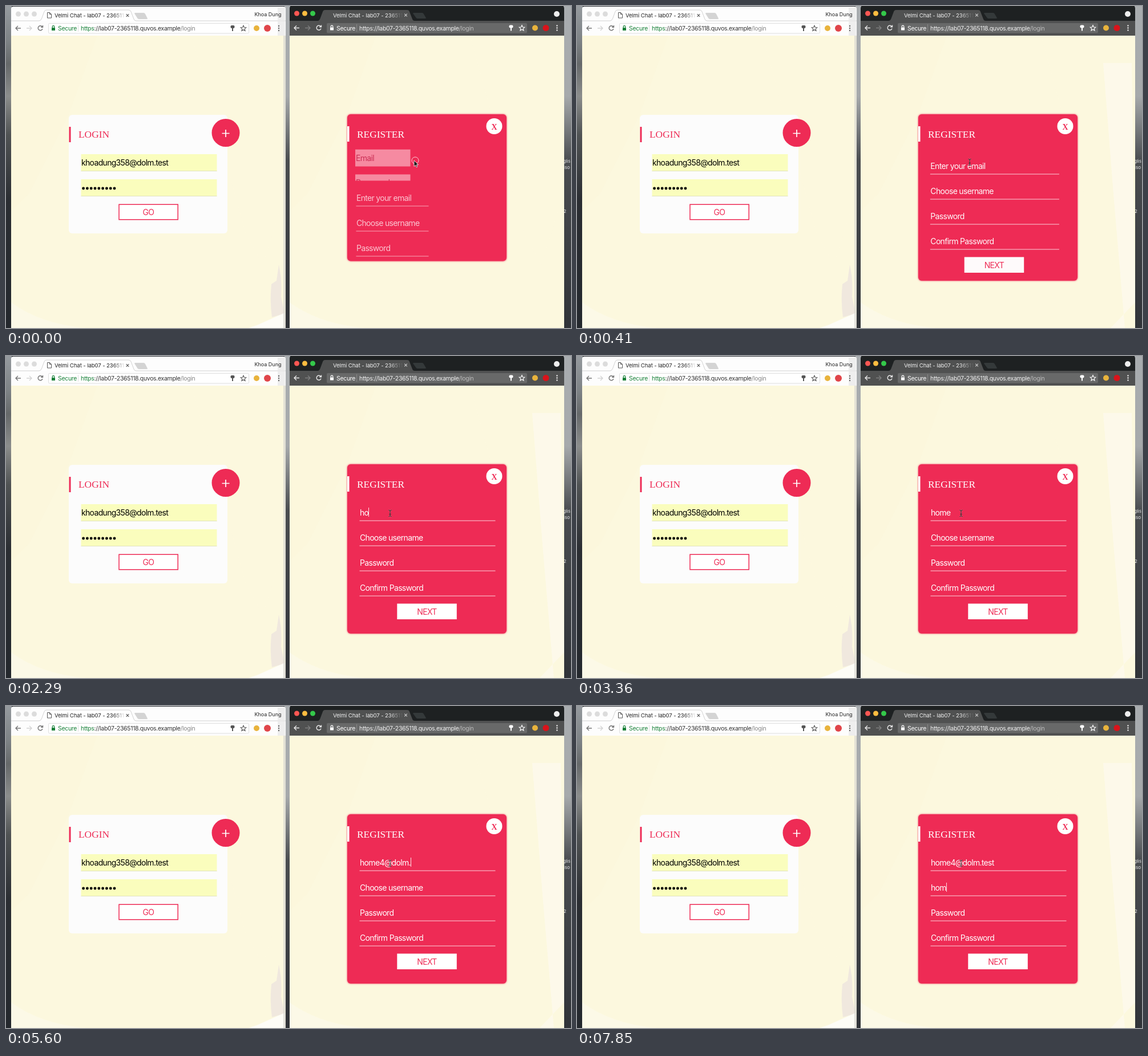
Animation, 990 px wide and 565 px high, one loop 8 s. Source, as an HTML page:

```html
<!DOCTYPE html>
<html lang="en">
<head>
<meta charset="utf-8">
<title>Sign-up form</title>
<style>
  html, body { margin: 0; width: 100%; height: 100%; overflow: hidden; background: #2b2e33; }
  svg { display: block; width: 100vw; height: 100vh; }
  text { font-family: Inter, sans-serif; white-space: pre; }
  .field { font-size: 14px; letter-spacing: -.68px; }
  .head { font: 17.4px "Liberation Serif", serif; }
  .bar { font-size: 10.5px; letter-spacing: -.32px; }
  .tab { font-size: 9.6px; letter-spacing: -.1px; }
  .icon { fill: none; stroke-width: 1.4; }
</style>
</head>
<body>
<svg viewBox="0 0 990 565" preserveAspectRatio="none">
  <defs>
    <linearGradient id="rock" x2="0" y2="1">
      <stop stop-color="#959a9e"/><stop offset=".11" stop-color="#7d8285"/>
      <stop offset=".18" stop-color="#66696a"/><stop offset=".28" stop-color="#8b8d8c"/>
      <stop offset=".4" stop-color="#505354"/><stop offset=".6" stop-color="#2b2e33"/>
      <stop offset="1" stop-color="#24282d"/>
    </linearGradient>
    <linearGradient id="mist" x2="0" y2="1">
      <stop stop-color="#a9adb0"/><stop offset=".28" stop-color="#a6a9ab"/>
      <stop offset=".48" stop-color="#4a4d50"/><stop offset="1" stop-color="#303338"/>
    </linearGradient>
    <linearGradient id="fadeL" gradientUnits="userSpaceOnUse" x1="188" x2="207"><stop stop-color="#222"/><stop offset="1" stop-color="#222" stop-opacity=".1"/></linearGradient>
    <linearGradient id="fadeR" gradientUnits="userSpaceOnUse" x1="672" x2="692"><stop stop-color="#f0f0f0"/><stop offset="1" stop-color="#f0f0f0" stop-opacity=".1"/></linearGradient>
    <filter id="glow" x="-10%" y="-10%" width="120%" height="120%"><feGaussianBlur stdDeviation="1.6"/></filter>
    <clipPath id="loginClip"><rect id="loginMask"/></clipPath>
    <clipPath id="formClip"><rect id="formMask" x="598" y="240" width="279"/></clipPath>
    <g id="nav" class="icon">
      <path d="M9 0H0M4-4L0 0l4 4"/>
      <path d="M19 0h9M24-4l4 4-4 4" opacity=".3"/>
      <path d="M46.500-2.500A4 4 0 1 0 47 1M47.500-5v3.300h-3.300"/>
    </g>
    <g id="lights"><circle cx="-14" r="4.500"/><circle r="4.500"/><circle cx="14" r="4.500"/></g>
    <g id="lock"><rect x="-3" y="-1" width="6" height="5" rx=".6"/><path class="icon" stroke="currentColor" style="stroke-width:1.2" d="M-1.800-1v-1.500a1.800 1.800 0 0 1 3.600 0V-1"/></g>
    <g id="key"><rect x="-3.500" y="-5" width="7" height="5" rx="2"/><rect x="-1" y="-1" width="2" height="6"/></g>
    <path id="star" fill="none" stroke-width="1.100" d="M0-4.800L1.400-1.500 4.800-1.200 2.200 1.100 3 4.500 0 2.700-3 4.500-2.200 1.100-4.800-1.200-1.400-1.500Z"/>
    <g id="dots"><circle cy="-4" r="1.200"/><circle r="1.200"/><circle cy="4" r="1.200"/></g>
    <path id="cross" class="icon" style="stroke-width:1.200" d="M-2.300-2.300l4.600 4.600M2.300-2.300l-4.600 4.600"/>
  </defs>

  <!-- desktop -->
  <rect width="10" height="565" fill="url(#rock)"/>
  <rect x="488" width="10" height="565" fill="url(#mist)"/>
  <rect x="977" width="13" height="565" fill="url(#mist)"/>
  <g fill="#e8e8e8" font-size="8"><text x="976" y="275">glis</text><text x="977" y="286">iso</text><text x="977" y="363">2</text></g>

  <!-- left window -->
  <path d="M9 565V5q0-4 4-4H486q4 0 4 4V565Z" fill="#fdfdfd"/>
  <use href="#lights" x="35.500" y="14" fill="#dcdcdc"/>
  <path d="M9 26H58q3 0 4.500-4L67 10q1-3 4-3H215q3 0 4 3l5 13q1 3 4 3H490" fill="#fff" stroke="#d2d2d2"/>
  <path d="M227 12h14q2 0 3 2l4 8q0 1-2 1h-13q-2 0-3-2l-5-8q0-1 2-1Z" fill="#d4d4d4"/>
  <path d="M72.500 11.500h4l3 3v6.500h-7ZM76.500 11.500v3h3" fill="#fff" stroke="#555"/>
  <text class="tab" x="85" y="20" fill="url(#fadeL)">Velmi Chat - lab07 - 236511</text>
  <use href="#cross" x="213" y="16.500" stroke="#555"/>
  <rect x="476" y="2" width="13" height="50" fill="#e8e8e8" opacity=".7"/>
  <text x="482.500" y="17.500" font-size="9" text-anchor="end" fill="#222">Khoa Dung</text>
  <use href="#nav" x="17" y="39" stroke="#777"/>
  <rect x="74.500" y="30.500" width="351" height="17.500" rx="2" fill="#fff" stroke="#dedede"/>
  <g fill="#188038" color="#188038"><use href="#lock" x="83" y="39"/><text class="bar" x="91" y="43">Secure</text></g>
  <path d="M126.500 33v12" stroke="#ddd"/>
  <text class="bar" x="131" y="43" fill="#333"><tspan fill="#188038">https</tspan>://lab07-2365118.quvos.example<tspan fill="#888">/login</tspan></text>
  <use href="#key" x="397" y="39" fill="#555"/><use href="#star" x="416" y="39" stroke="#555"/>
  <circle cx="439" cy="39" r="5" fill="#e9b33c"/><circle cx="458" cy="39" r="6" fill="#e0454a"/>
  <use href="#dots" x="478" y="39" fill="#666"/>
  <rect x="9" y="52" width="481" height="513" fill="#fcf8de"/>
  <g id="wash">
    <path d="M9 52H160L110 190 40 330 9 360Z" fill="#fcf5d8" opacity=".3"/>
    <path d="M325 52H489V330L450 455 420 400Z" fill="#fdf9df" opacity=".6"/>
    <path d="M9 520Q60 558 140 565H9Z" fill="#fdfaea" opacity=".8"/>
  </g>
  <path d="M478 454Q484 480 482 510L488 540 466 546Q462 520 465 488L474 482Z" fill="#eee5df" opacity=".8"/>
  <path d="M440 560L489 538V565H425Z" fill="#fefdf7"/>
  <rect x="486" y="52" width="4" height="513" fill="#d9d8d2" opacity=".7"/>

  <rect x="110" y="191" width="278" height="208" rx="6" fill="#fcfcfc"/>
  <rect x="110.500" y="212" width="3" height="27" fill="#ee2b55"/>
  <text class="head" x="127" y="231" fill="#ee2b55">LOGIN</text>
  <circle cx="385" cy="222.500" r="24.500" fill="#ee2b55"/>
  <path d="M378.500 223.500h13M385 217v13" stroke="#fff" stroke-width="1.700"/>
  <g fill="#fafdbd"><rect x="131.500" y="260" width="238" height="30"/><rect x="131.500" y="304" width="238" height="30"/></g>
  <path d="M131.500 289.500h238M131.500 333.500h238" stroke="#e2e4bd"/>
  <text class="field" x="132" y="280">khoadung358@dolm.test</text>
  <g id="secret"></g>
  <rect x="198" y="348.250" width="103.250" height="26.500" fill="#fff" stroke="#ee2b55" stroke-width="1.500"/>
  <text class="field" x="249.500" y="366.500" text-anchor="middle" fill="#ee2b55">GO</text>

  <!-- right window -->
  <path d="M497 565V4q0-4 4-4H974q4 0 4 4V565Z" fill="#1e2122"/>
  <circle cx="509.500" cy="13" r="4.500" fill="#fc5753"/><circle cx="523.500" cy="13" r="4.500" fill="#fdbc40"/><circle cx="537.500" cy="13" r="4.500" fill="#34c84a"/>
  <path d="M497 26H546q3 0 4.500-4L555 10q1-3 4-3H703q3 0 4 3l5 13q1 3 4 3H978V52H497Z" fill="#505151"/>
  <path d="M715 12h14q2 0 3 2l4 7q0 1-2 1h-13q-2 0-3-2l-5-7q0-1 2-1Z" fill="#34393a"/>
  <text class="tab" x="573" y="19.500" fill="url(#fadeR)">Velmi Chat - lab07 - 236511</text>
  <use href="#cross" x="700.500" y="16" stroke="#ccc"/>
  <circle cx="965" cy="14" r="5" fill="#eee"/>
  <use href="#nav" x="505" y="38.500" stroke="#e8e8e8"/>
  <rect x="562" y="30" width="351" height="17.500" rx="2" fill="#686969"/>
  <g fill="#fff" color="#fff"><use href="#lock" x="571" y="38.500"/><text class="bar" x="579" y="42.500">Secure</text></g>
  <path d="M614.500 32v13" stroke="#888"/>
  <text class="bar" x="619" y="42.500" fill="#f2f2f2">https://lab07-2365118.quvos.example<tspan fill="#bbb">/login</tspan></text>
  <use href="#key" x="885" y="38.500" fill="#fff"/><use href="#star" x="904" y="38.500" stroke="#fff"/>
  <circle cx="927" cy="38.500" r="5" fill="#e9b33c"/><circle cx="946" cy="38.500" r="5.500" fill="#d9131b"/>
  <use href="#dots" x="965.500" y="38.500" fill="#eee"/>
  <rect x="497" y="52" width="481" height="513" fill="#fcf8de"/>
  <use href="#wash" x="488"/>
  <path id="light" d="M922 100H972L978 520 935 565H960L940 330Z" fill="#fefbee" opacity=".8"/>

  <rect class="card" x="598" y="190" width="279" rx="6" fill="#ee2b55" filter="url(#glow)"/>
  <rect class="card" x="598" y="190" width="279" rx="6" fill="#ee2b55"/>
  <rect x="598" y="211" width="3.500" height="27" fill="#fff"/>
  <text class="head" x="615" y="230.500" fill="#fff">REGISTER</text>
  <circle cx="855.500" cy="211" r="14" fill="#fff"/>
  <text x="855.500" y="216.500" text-anchor="middle" fill="#ee2b55" style="font:bold 14px 'Liberation Serif',serif">X</text>

  <g id="login" clip-path="url(#loginClip)">
    <g fill="#fff"><rect width="238" height="30"/><rect y="44" width="238" height="30"/></g>
    <g class="field" fill="#901038" opacity=".85"><text x="1" y="20">Email</text><text x="1" y="63">Password</text></g>
  </g>
  <g clip-path="url(#formClip)"><g id="form" fill="#fff">
    <g id="rows"></g>
    <rect id="next" y="434.500" width="104.500" height="27.500"/>
    <text id="nextText" class="field" y="453.500" text-anchor="middle" fill="#ee2b55">NEXT</text>
  </g></g>
  <rect id="caret" width="1" height="16" fill="#fff" opacity=".85"/>

  <g id="arrow">
    <circle cx="717" cy="271" r="6" fill="none" stroke="#fff" stroke-opacity=".75"/>
    <path d="M715 271v10.500l2.500-2.300 1.700 3.700 1.700-.8-1.700-3.500h3.300Z" fill="#111" stroke="#fff" stroke-width=".8"/>
  </g>
  <g id="beam" fill="none">
    <path d="M-2.500-5.500Q0-5.500 0-4V4Q0 5.500 2.500 5.500M2.500-5.500Q0-5.500 0-4M0 4Q0 5.500-2.500 5.500" stroke="#fff" stroke-opacity=".3" stroke-width="2"/>
    <path d="M-2.500-5.500Q0-5.500 0-4V4Q0 5.500 2.500 5.500M2.500-5.500Q0-5.500 0-4M0 4Q0 5.500-2.500 5.500M-1.500 1.500h3" stroke="#222"/>
  </g>
</svg>
<script>
const LOOP = 8000;
const $ = id => document.getElementById(id);
const set = (el, attrs) => { for (const k in attrs) el.setAttribute(k, attrs[k]); };
const add = (parent, tag, attrs) => {
  const el = document.createElementNS('http://www.w3.org/2000/svg', tag);
  set(el, attrs);
  return parent.appendChild(el);
};

for (let i = 0; i < 9; i++) add($('secret'), 'circle', { cx: 135.6 + i * 6.8, cy: 320, r: 2.4 });

const labels = ['Enter your email', 'Choose username', 'Password', 'Confirm Password'];
const rows = labels.map((label, i) => ({
  text: add($('rows'), 'text', { class: 'field', y: 279.5 + i * 44 }),
  line: add($('rows'), 'rect', { y: 288.5 + i * 44, height: 1, opacity: .8 })
}));
const cards = document.querySelectorAll('.card');

// time, form growth, login left, top, width, height, opacity
const slide = [
  [0, .534, 612, 251.5, 96.5, 62, .45],
  [140, .769, 608.5, 248, 41, 30, .22],
  [410, .95, 602, 244, 8, 6, .04],
  [560, 1, 600, 242, 0, 0, 0]
];
// time, pointer x, y
const pointer = [[0, 715, 271], [140, 702, 272.5], [410, 688, 274], [560, 677, 275], [710, 673, 276]];
// time, email length, username, row with the caret (-1: hidden)
const mail = 'home4@dolm.test';
const typing = [
  [0, 0, '', -1], [950, 0, '', 0], [1240, 0, '', -1], [1840, 0, '', 0],
  [2140, 1, '', 0], [2290, 2, '', 0], [2620, 3, '', 0], [2920, 4, '', 0],
  [3360, 4, '', -1], [3810, 4, '', 0], [4260, 5, '', 0],
  [4860, 6, '', 0], [5000, 7, '', 0], [5150, 8, '', 0], [5300, 10, '', 0],
  [5600, 11, '', 0], [5750, 12, '', 0], [5900, 14, '', 0], [6200, 15, '', 0],
  [6350, 15, '', 1], [6650, 15, 'h', 1], [6950, 15, 'ho', 1],
  [7250, 15, 'hon', 1], [7700, 15, 'ho', 1], [7850, 15, 'hom', 1]
];
const at = (steps, t) => steps.findLast(s => s[0] <= t);

function drawForm(t) {
  const [, grow, left, top, width, height, alpha] = at(slide, t);
  const bottom = 487 + height - 218 * (1 - grow);
  const x = 620 - 13 * (1 - grow), w = 238 * grow;
  cards.forEach(c => set(c, { height: bottom - 190 }));
  set($('login'), { transform: `translate(${left} ${top})`, opacity: alpha });
  set($('loginMask'), { width, height: Math.max(0, height - 7) });
  set($('formMask'), { height: bottom - 246 });
  set($('form'), { transform: `translate(0 ${height})`, opacity: Math.sqrt(grow) });
  rows.forEach(r => { set(r.text, { x }); set(r.line, { x: x - .5, width: w }); });
  set($('next'), { x: x + w / 2 - 53.7 });
  set($('nextText'), { x: x + w / 2 - 1.5 });
}

function drawTyping(t) {
  const [, count, user, row] = at(typing, t);
  const typed = [mail.slice(0, count), user, '', ''];
  rows.forEach((r, i) => r.text.textContent = typed[i] || labels[i]);
  set($('caret'), { visibility: row < 0 ? 'hidden' : 'visible' });
  if (row < 0) return;
  const end = typed[row] ? rows[row].text.getComputedTextLength() : 0;
  set($('caret'), { x: Math.round(620 + end), y: 266 + row * 44 });
}

function drawPointer(t) {
  const [, x, y] = at(pointer, t);
  const pressed = t < 140;
  set($('arrow'), { visibility: pressed ? 'visible' : 'hidden' });
  set($('beam'), { visibility: pressed ? 'hidden' : 'visible', transform: `translate(${x} ${y})` });
  set($('light'), { visibility: pressed ? 'hidden' : 'visible' });
}

const start = performance.now();
function tick() {
  const t = (performance.now() - start) % LOOP;
  drawForm(t);
  drawTyping(t);
  drawPointer(t);
  requestAnimationFrame(tick);
}
tick();
</script>
</body>
</html>
```
